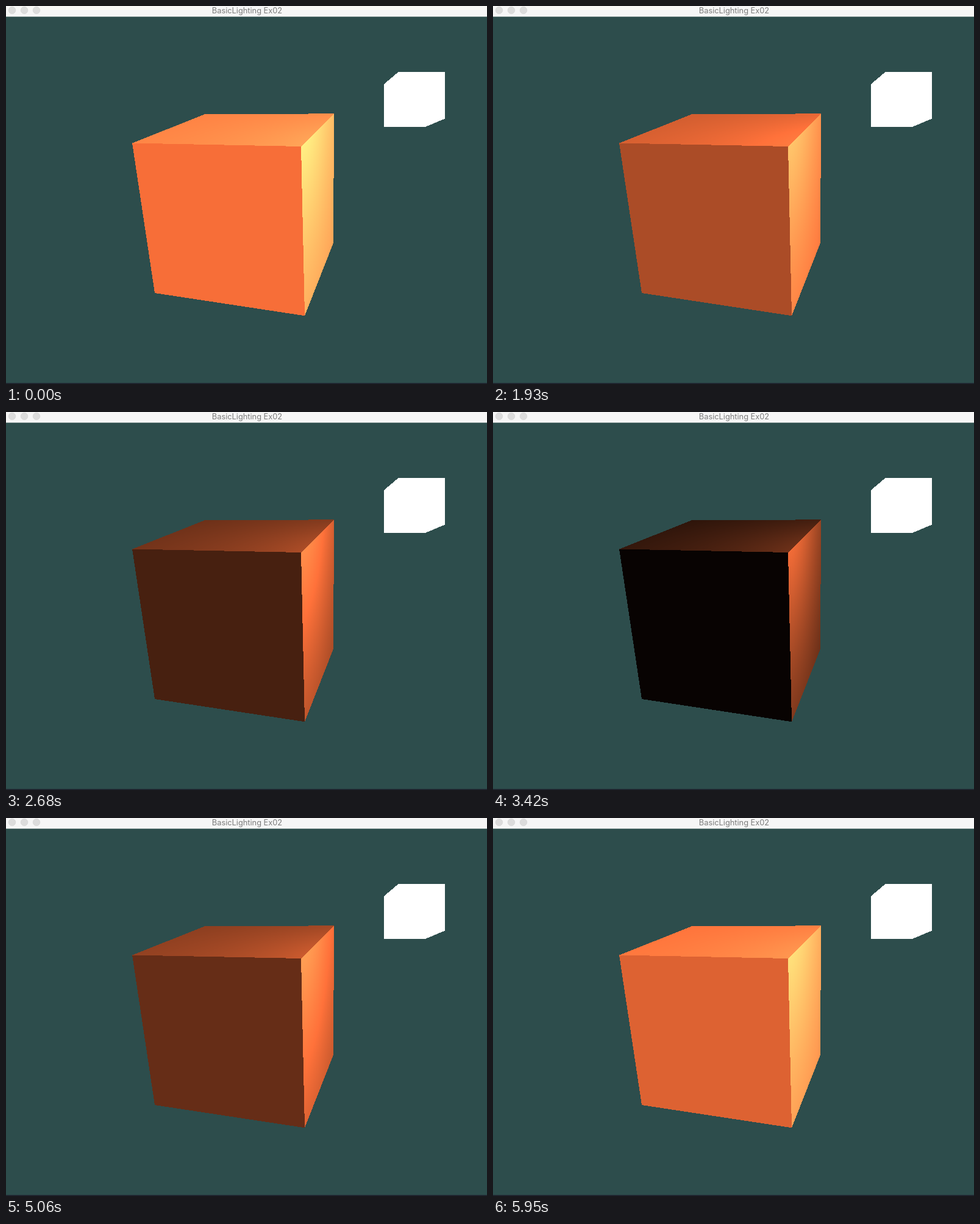
An HTML page with a canvas that plays this animation: 789 by 619 pixels, repeating every 6.05 s.

```html
<!DOCTYPE html>
<html lang="en">
<head>
<meta charset="utf-8">
<title>Basic lighting</title>
<style>
  html, body { margin: 0; width: 100%; height: 100%; overflow: hidden; background: #2d4d4c; }
  svg, canvas { position: absolute; left: 0; top: 0; display: block; }
  text { font: 12.8px Inter, Roboto, sans-serif; fill: #7c7c7c; text-anchor: middle; }
</style>
</head>
<body>
<svg width="789" height="619" viewBox="0 0 789 619">
  <rect width="789" height="619" fill="#2d4d4c"/>
  <rect width="789" height="17.5" fill="#f6f6f6"/>
  <g fill="#dcdcdc" stroke="#d1d1d1" stroke-width=".6">
    <circle cx="10" cy="7" r="5.8"/>
    <circle cx="30" cy="7" r="5.8"/>
    <circle cx="50" cy="7" r="5.8"/>
  </g>
  <text x="395.5" y="12">BasicLighting Ex02</text>
  <path d="M643.5 108H720V184.5L689 197.5H620V128Z" fill="#fff" shape-rendering="crispEdges"/>
  <rect y="617.5" width="789" height="1.5" fill="#1c1f2b"/>
</svg>
<canvas width="789" height="619"></canvas>
<script>
const LOOP = 6050;
const BOX = { x: 205, y: 174, w: 336, h: 336 };
const ctx = document.querySelector('canvas').getContext('2d');
const image = ctx.createImageData(BOX.w, BOX.h);

// Visible cube corners on screen: top, then bottom
const A = [207, 224.5], B = [484, 230], C = [538, 176.3], D = [326, 177.3];
const E = [244, 470], F = [490, 507.3], G = [537, 388];

// Light position relative to the near top right corner, cube edge = 1
const light = [0.7, 0.3, 0];

const cross = (a, b) => [
  a[1] * b[2] - a[2] * b[1],
  a[2] * b[0] - a[0] * b[2],
  a[0] * b[1] - a[1] * b[0]
];
const dot = (a, b) => a[0] * b[0] + a[1] * b[1] + a[2] * b[2];

// Perspective inverse: screen point -> (u, v) on a quad, or null outside it
function unproject(corners) {
  const [o, u, uv, v] = corners.map(p => [...p, 1]);
  const mid = cross(cross(o, uv), cross(u, v));
  const [left, right, top, bottom] =
    [[o, v], [u, uv], [o, u], [v, uv]].map(([p, q]) => {
      const line = cross(p, q), scale = dot(line, mid) / mid[2];
      return line.map(n => n / scale);
    });
  return p => {
    const [l, r, t, b] = [left, right, top, bottom].map(line => dot(line, p));
    return Math.min(l, r, t, b) < 0 ? null : [l / (l + r), t / (t + b)];
  };
}

// Each face gives its position in cube space and the axis of its normal
const faces = [
  { uv: unproject([A, B, F, E]), at: (u, v) => [u - 1, -v, 0], axis: 2 },
  { uv: unproject([A, B, C, D]), at: (u, v) => [u - 1, 0, -v], axis: 1 },
  { uv: unproject([B, C, G, F]), at: (u, v) => [0, -v, -u], axis: 0 }
];

function diffuseAt(x, y) {
  for (const { uv, at, axis } of faces) {
    const hit = uv([x + 0.5, y + 0.5, 1]);
    if (!hit) continue;
    const pos = at(...hit);
    const ray = light.map((n, i) => n - pos[i]);
    return Math.max(0, ray[axis] / Math.hypot(...ray));
  }
  return -1;
}

const diffuse = new Float32Array(BOX.w * BOX.h).map((_, i) =>
  diffuseAt(BOX.x + i % BOX.w, BOX.y + Math.floor(i / BOX.w)));

// Ambient phase over time: [ms, radians]
const phases = [
  [0, 0.354], [300, 0.43], [1330, 0.524], [1930, 1.224], [2380, 1.723],
  [3420, 2.79], [5060, 4.511], [5950, 5.536]
];

const run = (start, count) => Array.from({ length: count }, (_, i) => start + 150 * i);
const steps = [0, 300, 1330, ...run(1630, 12), 3420, ...run(4310, 6), ...run(5200, 6)];

function ambientAt(ms) {
  const i = Math.max(1, phases.findIndex(([t]) => t >= ms));
  const [t0, a] = phases[i - 1], [t1, b] = phases[i];
  return (1 + Math.cos(a + (b - a) * (ms - t0) / (t1 - t0))) / 2;
}

function render(ambient) {
  const px = image.data;
  diffuse.forEach((d, i) => {
    if (d < 0) return;
    const lit = ambient + d;
    const r = Math.min(1, lit), g = Math.min(1, lit * 0.5), b = Math.min(1, lit * 0.31);
    // Colour as shown by the display profile
    px[4 * i] = 255 * r;
    px[4 * i + 1] = 255 * (1.11 * g - 0.11 * r);
    px[4 * i + 2] = 255 * (1.04 * b - 0.095 * r);
    px[4 * i + 3] = 255;
  });
  ctx.putImageData(image, BOX.x, BOX.y);
}

let shown = -1;
const start = performance.now();
function frame() {
  const ms = (performance.now() - start) % LOOP;
  const step = steps.filter(t => t <= ms).pop();
  if (step !== shown) render(ambientAt(shown = step));
  requestAnimationFrame(frame);
}
frame();
</script>
</body>
</html>
```
